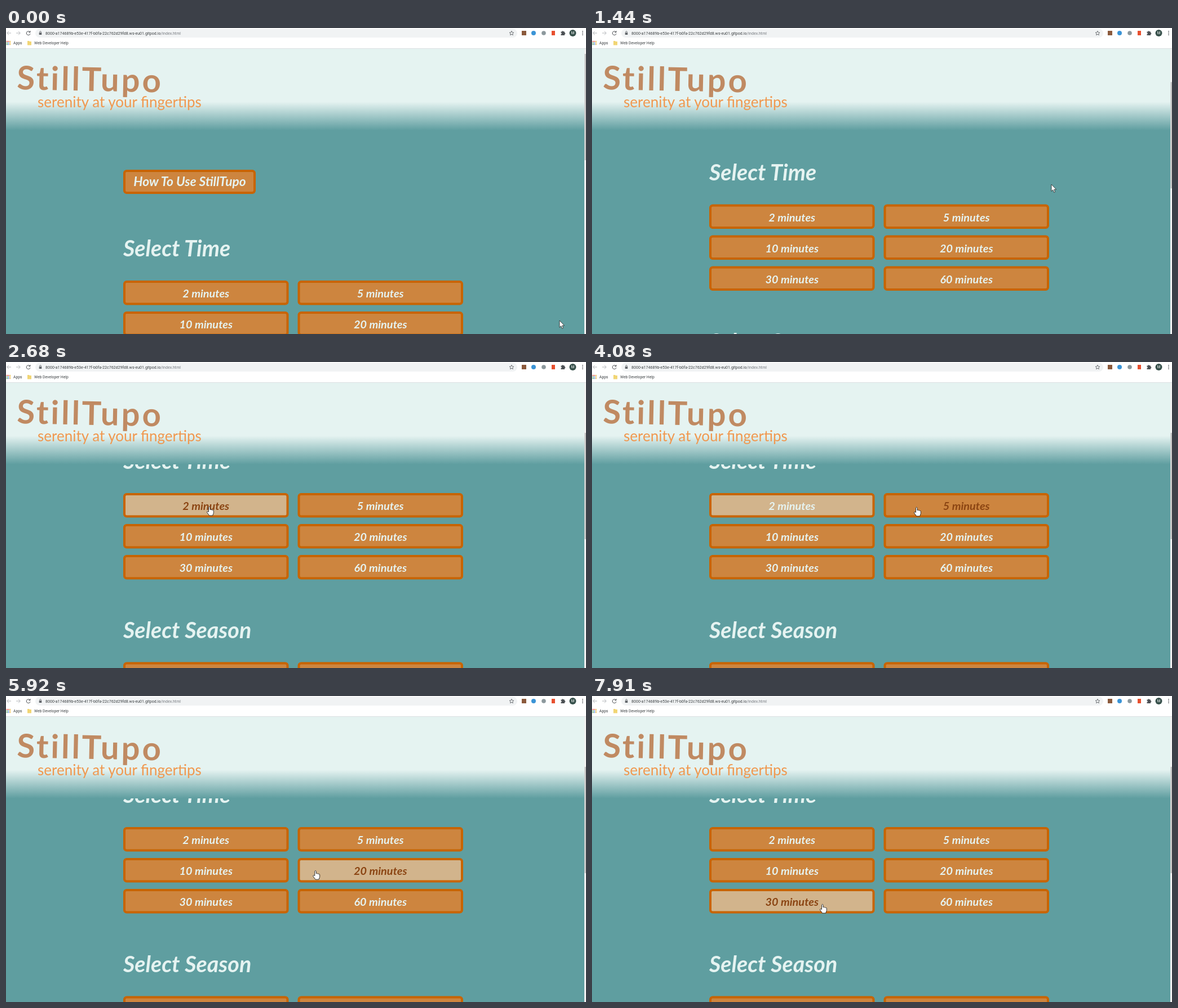
Animation of 1029x544 px, one loop 7990 ms. Source, as an HTML page:

```html
<!DOCTYPE html>
<html lang="en">
<head>
<meta charset="utf-8">
<title>StillTupo</title>
<style>
  html, body { margin: 0; width: 100%; height: 100%; overflow: hidden; background: #5f9ea0; }
  svg { display: block; width: 100%; height: 100%; }
  text { font-family: Lato, sans-serif; white-space: pre; }
  .ui text { font-family: Roboto, sans-serif; font-size: 6.8px; fill: #3c4043; }
  .page text { font-weight: 700; font-style: italic; fill: #e5f3f1; }
  .page .heading { font-size: 39.5px; }
  .page .label { font-size: 19.9px; text-anchor: middle; }
  .page .on { fill: #8b4513; }
  .page rect { fill: #cd853f; stroke: #c86400; stroke-width: 4; }
</style>
</head>
<body>
<svg viewBox="0 0 1029 544">
  <defs>
    <linearGradient id="fade" x2="0" y2="1">
      <stop offset=".65" stop-color="#e5f3f1"/>
      <stop offset="1" stop-color="#5f9ea0"/>
    </linearGradient>
  </defs>
  <rect width="1029" height="544" fill="#5f9ea0"/>

  <g class="page" id="page">
    <rect x="210" y="254" width="231" height="39" rx="4"/>
    <text class="label" x="326" y="281" style="font-size:22.8px">How To Use StillTupo</text>
    <text class="heading" x="208" y="406">Select Time</text>
    <text class="heading" x="208" y="707">Select Season</text>
  </g>

  <rect y="37" width="1026" height="145" fill="url(#fade)"/>
  <text x="19" y="109" transform="rotate(1.2 19 109)" font-size="58" font-weight="700" letter-spacing="4" fill="#c08a62">StillTupo</text>
  <text x="56" y="141" font-size="26" fill="#f0984f">serenity at your fingertips</text>

  <rect x="1026" y="37" width="3" height="507" fill="#f1f1f1"/>
  <rect id="thumb" x="1026.5" y="46" width="2.5" height="189" fill="#c1c1c1"/>

  <g class="ui">
    <rect width="1029" height="37" fill="#fff"/>
    <rect y="36" width="1029" height="1" fill="#dcdfe2"/>
    <rect x="52" y="1.5" width="855" height="15.5" rx="7.75" fill="#f1f3f4"/>
    <g fill="none" stroke="#b4b7ba">
      <path d="M9 9H2M5 5.7 1.7 9 5 12.3M18 9h7M22 5.7 25.300 9 22 12.300"/>
      <path d="M42.300 7A3.400 3.400 0 1 0 43 10M43 5v2.700h-2.700" stroke="#45494d"/>
      <path d="M59.700 8.500V7a1.300 1.300 0 0 1 2.600 0v1.500" stroke="#5f6368" stroke-width=".8"/>
      <path d="m897 5.300 1.100 2.500 2.700.3-2 1.800.6 2.700-2.400-1.400-2.400 1.400.6-2.700-2-1.800 2.700-.3z" stroke="#505458" stroke-width=".8"/>
    </g>
    <rect x="58.700" y="8.300" width="4.600" height="3.700" fill="#5f6368"/>
    <text x="70" y="11.800" style="font-size:7.050px">8000-a174689b-e53e-417f-b0fa-22c762d29fd8.ws-eu01.gitpod.io<tspan fill="#777b80">/index.html</tspan></text>
    <g id="apps"></g>
    <text x="13" y="29">Apps</text>
    <path d="M38 23h3l1 1h3v6.500h-7z" fill="#f1d574"/>
    <text x="50" y="29">Web Developer Help</text>

    <rect x="915" y="5" width="8" height="8" fill="#8b5a3c"/>
    <circle cx="936" cy="9" r="4" fill="#3b94d6"/>
    <circle cx="954" cy="9" r="3.800" fill="#8d999d"/>
    <rect x="968" y="5" width="6" height="8" fill="#e8502f"/>
    <path d="M984.500 6.500h2a1.300 1.300 0 0 1 2.600 0h2v2a1.300 1.300 0 0 1 0 2.600v2h-6.600v-2a1.300 1.300 0 0 0 0-2.600z" fill="#4d5155"/>
    <circle cx="1005.500" cy="9" r="6" fill="#37504b"/>
    <text x="1005.500" y="11.300" text-anchor="middle" style="fill:#fff;font-size:6.500px">M</text>
    <path d="M1023 5.200v1.600M1023 8.200v1.600M1023 11.200v1.600" stroke="#4d5155" stroke-width="1.600"/>
  </g>

  <g id="cursor" stroke-linejoin="round">
    <path id="arrow" d="M0 0V12.300L2.800 9.700 4.700 14.300 6.700 13.400 4.800 9H8.600Z" fill="#fff" stroke="#222" stroke-width=".8"/>
    <path id="hand" d="M-1.500 9.500V1.300Q-.2-.9 1 1.300V5.500Q2.400 4.400 3.400 6 4.700 5 5.500 6.500 7.200 5.900 7.300 7.700V11.500L5.600 16H-.3L-4.500 10.200Q-4.300 8-2.700 8.600Z" fill="#fff" stroke="#222" stroke-width=".9"/>
  </g>
</svg>

<script>
const LOOP = 7990;
const BUTTON = { width: 293.500, height: 43.500 };

// Bursts of screen updates: first update, last update, number of updates.
const BURSTS = [
  [70, 420, 6], [570, 730, 3], [950, 1670, 10], [1890, 2680, 11],
  [3000, 3070, 2], [3530, 4080, 8], [4310, 4540, 4], [4850, 5160, 5],
  [5390, 5610, 4], [5770, 6550, 11], [6800, 7190, 6], [7510, 7750, 4], [7910, 7910, 1],
];
// Keyframes: time, value...
const SCROLL = [
  [870, 0], [950, 12], [1030, 35], [1110, 53], [1270, 80], [1350, 110], [1430, 135.500],
  [1510, 152], [1670, 162], [1811, 162], [1890, 174], [1969, 197], [2048, 211], [2127, 216],
];
const POINTER = [
  [0, 982, 520], [420, 787, 278], [500, 787, 278], [730, 803, 272.500],
  [1030, 804, 272.500], [1430, 815, 278], [2048, 815, 278], [2600, 361, 257],
  [2930, 361, 257], [3070, 355, 248], [3450, 355, 248], [4080, 576, 258],
  [4772, 576, 258], [5160, 586, 309], [5692, 586, 309], [6100, 490, 312],
  [6550, 410, 310], [6722, 410, 310], [7190, 401, 370], [7750, 401, 370], [7910, 409, 370],
];
// Button backgrounds follow the pointer late: fade start, fade end, button.
const FADES = [
  [2450, 2680, 0], [4233, 4540, 1], [5317, 5610, 3], [6300, 6550, 2], [7430, 7750, 4],
];

const byId = id => document.getElementById(id);
const mix = (a, b, k) => a + (b - a) * k;
const ramp = (t, from, to) => Math.min(1, Math.max(0, (t - from) / (to - from)));

function add(parent, tag, attributes, text = '') {
  const node = document.createElementNS('http://www.w3.org/2000/svg', tag);
  for (const name in attributes) node.setAttribute(name, attributes[name]);
  node.textContent = text;
  return parent.appendChild(node);
}

function addButton(column, top, label) {
  const x = 208 + column * 309.500;
  const box = add(byId('page'), 'rect', {
    x: x + 2, y: top + 2, width: BUTTON.width - 4, height: BUTTON.height - 4, rx: 4,
  });
  const text = add(byId('page'), 'text', {
    class: 'label', x: x + BUTTON.width / 2, y: top + 30,
  }, label);
  return { x, top, box, text };
}

const buttons = [2, 5, 10, 20, 30, 60].map((minutes, i) =>
  addButton(i % 2, 449 + 55 * Math.floor(i / 2), minutes + ' minutes'));
addButton(0, 749.500, '');
addButton(1, 749.500, '');

['#e34b3d', '#e34b3d', '#e8b12c', '#3f9c55', '#4a80d8', '#e8b12c', '#3f9c55', '#4a80d8', '#e8b12c']
  .forEach((fill, i) => add(byId('apps'), 'rect', {
    x: 1 + i % 3 * 2.700, y: 23 + Math.floor(i / 3) * 2.700, width: 1.700, height: 1.700, fill,
  }));

function lastUpdate(t) {
  let shown = 0;
  for (const [start, end, count] of BURSTS) {
    if (t < start) break;
    const step = (end - start) / Math.max(1, count - 1);
    shown = t >= end ? end : start + Math.floor((t - start) / step) * step;
  }
  return shown;
}

function track(keys, t) {
  const next = keys.findIndex(key => key[0] > t);
  if (next < 0) return keys[keys.length - 1].slice(1);
  if (next === 0) return keys[0].slice(1);
  const a = keys[next - 1], b = keys[next];
  return a.slice(1).map((value, i) => mix(value, b[i + 1], ramp(t, a[0], b[0])));
}

function highlights(t) {
  const levels = buttons.map(() => 0);
  for (const [start, end, target] of FADES) {
    const k = ramp(t, start, end);
    levels.forEach((level, i) => { levels[i] = mix(level, i === target ? 1 : 0, k); });
  }
  return levels;
}

function draw(time) {
  const t = lastUpdate(time);
  const [scroll] = track(SCROLL, t);
  const [x, y] = track(POINTER, t);
  const levels = highlights(t);
  let over = false;

  buttons.forEach((button, i) => {
    const top = button.top - scroll;
    const hit = x >= button.x && x <= button.x + BUTTON.width && y >= top && y <= top + BUTTON.height;
    over = over || hit;
    button.text.classList.toggle('on', hit);
    const k = levels[i];
    button.box.style.fill = `rgb(${mix(205, 210, k)},${mix(133, 180, k)},${mix(63, 140, k)})`;
  });

  byId('page').setAttribute('transform', `translate(0 ${-scroll})`);
  byId('thumb').setAttribute('y', 46 + scroll * 0.370);
  byId('cursor').setAttribute('transform', `translate(${x} ${y})`);
  byId('arrow').style.display = over ? 'none' : '';
  byId('hand').style.display = over ? '' : 'none';
}

const begin = performance.now();
function frame() {
  draw((performance.now() - begin) % LOOP);
  requestAnimationFrame(frame);
}
frame();
</script>
</body>
</html>
```
